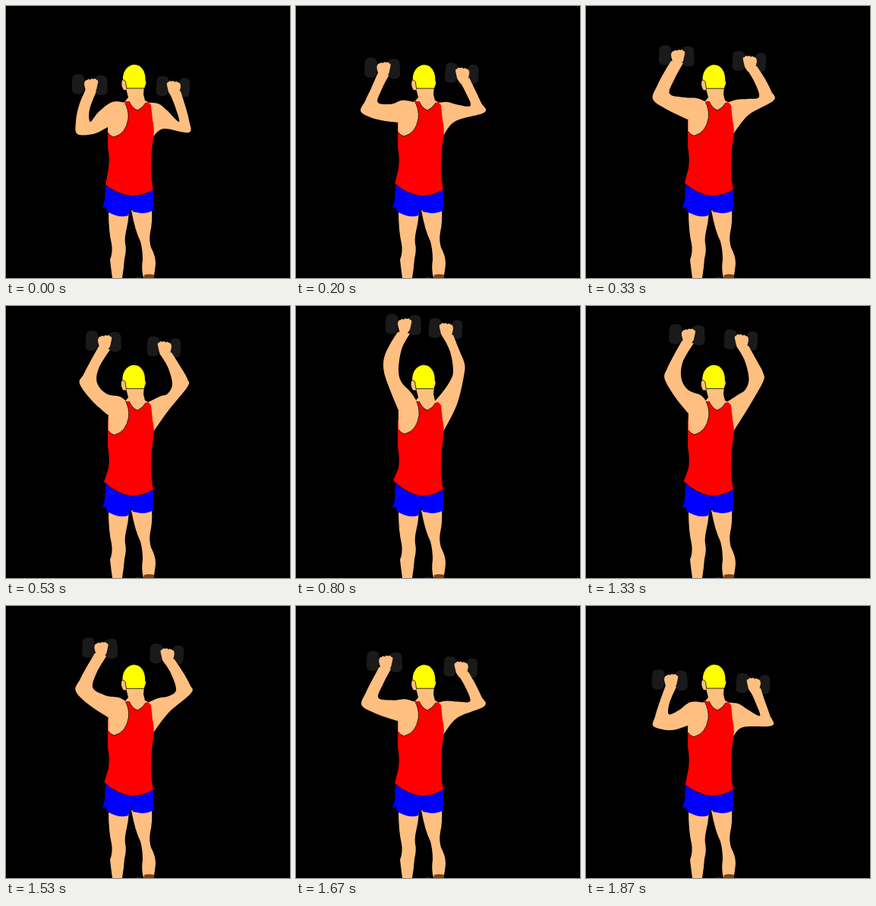
Animation of 374 by 357 pixels, one loop 1940 ms. Source, as an HTML page:

```html
<!DOCTYPE html>
<html lang="en">
<head>
<meta charset="utf-8">
<title>Dumbbell press</title>
<style>
html, body { margin: 0; width: 100%; height: 100%; overflow: hidden; background: #000; }
svg { display: block; width: 100vw; height: 100vh; }
.skin { fill: #ffbf80; }
.line { fill: none; stroke: #000; stroke-width: .8; }
.iron { fill: #1a1a1a; }
</style>
</head>
<body>
<svg viewBox="0 0 374 357">
  <defs>
    <path id="fist" class="skin" d="M-9-1q0-6 4-6 2-2 4 0 1-3 4-1 3-2 4 1 3 0 2 4l-2 9-4 6h-9z"/>
    <rect id="plate" class="iron" x="-8" y="-13" width="16" height="26" rx="6"/>
  </defs>
  <g id="rightBell">
    <rect class="iron" x="-15" y="-4" width="29" height="7"/>
    <use href="#plate" transform="translate(-15 -2) rotate(4)"/>
    <use href="#plate" transform="translate(14 0) rotate(3) scale(.88 .96)"/>
  </g>
  <g id="leftBell">
    <rect class="iron" x="-17" y="-4" width="30" height="7"/>
    <use href="#plate" transform="translate(-17 -1.5) rotate(3)"/>
    <use href="#plate" transform="translate(13.5 0) rotate(-3)"/>
  </g>
  <path id="rightArm" class="skin"/>
  <use id="rightFist" href="#fist"/>
  <path class="skin" d="M134 268L162 270Q161 284 158 296 156 305 157 312 159 320 156 332 155 345 153 357H140Q138 342 137 333 141 323 139 312 135 295 135 268zM165 268L192 266Q193 284 190 297 188 307 191 317 197 328 197 338 196 350 194 357H181Q178 345 180 333 180 320 177 309 170 295 165 268z"/>
  <path fill="#7f3f0f" d="M181 357L182 353Q188 351 195 353V357z"/>
  <path fill="#00f" d="M169 357Q173 354 179 357z"/>
  <path class="skin" d="M157 104H182L181 116 183 124 191 128 185 136 173 140 158 132 156 126 161 120z"/>
  <path fill="#00f" d="M131 234L194 240V268Q188 272 178 272L167 270 165 264 161 275Q152 278 142 274L133 270 132 264 127 265 130 255z"/>
  <path id="shirt" fill="#f00"/>
  <path id="hem" class="line"/>
  <path class="line" d="M162 125Q166 134 173 137 180 134 184 127"/>
  <g id="armhole">
    <path class="skin" d="M134 145V166Q137 171 142 172 158 168 161 148 162 136 156 126L134 137z"/>
    <path class="line" d="M134 166Q137 171 142 172 158 168 161 148 162 136 156 126"/>
  </g>
  <path id="leftArm" class="skin"/>
  <use id="leftFist" href="#fist"/>
  <g id="head">
    <path class="skin" d="M181 97Q186 97 184 103L182 108z"/>
    <path fill="#ff0" d="M154 98C153 85 161 77 169.500 77 178 77 184 86 183.500 97L182 108H158z"/>
    <path class="line" d="M159 108H182"/>
    <path class="skin" d="M154 97Q158 97 158 103L159 110 155 110Q151 104 153 98z"/>
    <path class="line" d="M154 97Q158 97 158 103L159 109"/>
  </g>
</svg>
<script>
const LOOP = 1940, STEP = 200 / 3, STEPS = 29, TOP = 12;
const stages = [0, 1, 5, 8, TOP];

// Each pose: fist centre, then wrist to armpit, then shoulder back to wrist.
const leftPoses = [
  '112,104 105,109 96,131 92,152 94,168 115,168 134,159 157,127 140,126 122,139 111,152 110,136 119,112',
  '112,98 105,104 97,126 91,145 89,158 112,163 134,157 157,127 138,126 122,137 109,142 110,127 119,106',
  '121,66 112,72 103,87 94,104 88,122 105,135 134,149 158,126 146,121 130,120 110,115 117,95 128,75',
  '130,47 122,53 111,73 102,90 97,102 113,124 134,143 158,125 150,119 132,115 120,101 122,82 137,57',
  '143,25 134,34 124,50 116,68 116,87 125,113 135,137 159,125 151,113 139,100 135,84 139,57 150,36'
].map(parse);
const rightPoses = [
  '221,107 230,112 236,131 241,150 241,166 208,161 194,171 184,127 200,128 212,137 228,152 222,130 214,111',
  '221,103 230,108 236,126 242,143 245,157 207,159 194,171 184,127 200,128 213,136 229,144 223,126 215,108',
  '216,74 225,79 236,96 244,112 247,124 214,143 194,168 184,128 198,123 213,122 228,119 221,98 209,79',
  '209,55 218,61 230,80 239,96 239,106 214,137 194,165 184,128 202,119 213,115 219,102 213,80 202,62',
  '198,31 207,38 215,58 222,76 221,92 212,129 194,165 182,126 193,113 202,100 207,86 203,60 192,38'
].map(parse);

const part = id => document.getElementById(id);

function parse(text) {
  return text.split(' ').map(pair => pair.split(',').map(Number));
}

// Smooth curve through unevenly spaced stages, straight beyond the last one.
function blend(values, at) {
  const last = stages.length - 1;
  const secant = i => (values[i + 1] - values[i]) / (stages[i + 1] - stages[i]);
  const slope = i => {
    if (i === 0) return secant(0);
    if (i === last) return secant(last - 1);
    const before = stages[i] - stages[i - 1], after = stages[i + 1] - stages[i];
    return (secant(i - 1) * after + secant(i) * before) / (before + after);
  };
  if (at >= TOP) return values[last] + (at - TOP) * slope(last);
  const i = stages.findIndex((s, n) => at < stages[n + 1]);
  const span = stages[i + 1] - stages[i], p = (at - stages[i]) / span, q = 1 - p;
  return values[i] * q * q * (1 + 2 * p) + values[i + 1] * p * p * (3 - 2 * p)
    + span * p * q * (slope(i) * q - slope(i + 1) * p);
}

function poseAt(poses, at) {
  return poses[0].map((_, n) => [0, 1].map(axis => blend(poses.map(pose => pose[n][axis]), at)));
}

function curve(points) {
  let d = points[0].join();
  for (let i = 0; i < points.length - 1; i++) {
    const a = points[i], b = points[i + 1];
    const before = points[i - 1] || a, after = points[i + 2] || b;
    const c1 = a.map((v, n) => v + (b[n] - before[n]) / 6);
    const c2 = b.map((v, n) => v - (after[n] - a[n]) / 6);
    d += `C${c1} ${c2} ${b}`;
  }
  return d;
}

function drawArm(side, poses, at, flip) {
  const [fist, ...outline] = poseAt(poses, at);
  part(side + 'Arm').setAttribute('d', `M${curve(outline.slice(0, 6))}L${curve(outline.slice(6))}z`);
  part(side + 'Bell').setAttribute('transform', `translate(${fist})`);
  part(side + 'Fist').setAttribute('transform', `translate(${fist}) scale(${flip} 1)`);
}

// Height of the lift for a step: up, a short slow peak, then back down.
function liftAt(step) {
  let lift = Math.min(step, STEPS - step);
  if (step > 17 && step < 24) lift += .5;
  const over = lift - TOP;
  return over > 0 ? TOP + over * (.8 - .17 * over) : lift;
}

function render(time) {
  const step = Math.min(STEPS - 1, Math.floor((time % LOOP + 3.4) / STEP));
  const lift = liftAt(step), rise = Math.min(1, lift / TOP);
  drawArm('left', leftPoses, lift, 1);
  drawArm('right', rightPoses, lift, -1);

  const hemX = 131 - 3 * rise, hemY = 235 - 6 * rise;
  const hem = `Q146 247 165 249.500 182 249 194 241`;
  part('shirt').setAttribute('d', `M${hemX} ${hemY}${hem}Q190 222 191 204 192 185 194 173 196 160 193 150 192 138 191 130L187 126 184 127Q180 134 173 137 166 134 162 125L156 125 134 150V185Q137 200 135 213z`);
  part('hem').setAttribute('d', `M${hemX} ${hemY}${hem}`);
  part('armhole').setAttribute('transform', `translate(${rise} ${-4 * rise})`);
  part('head').setAttribute('transform', `translate(${-.8 * rise} ${.6 * rise})`);
}

function tick(now) {
  render(now);
  requestAnimationFrame(tick);
}
render(0);
requestAnimationFrame(tick);
</script>
</body>
</html>
```
